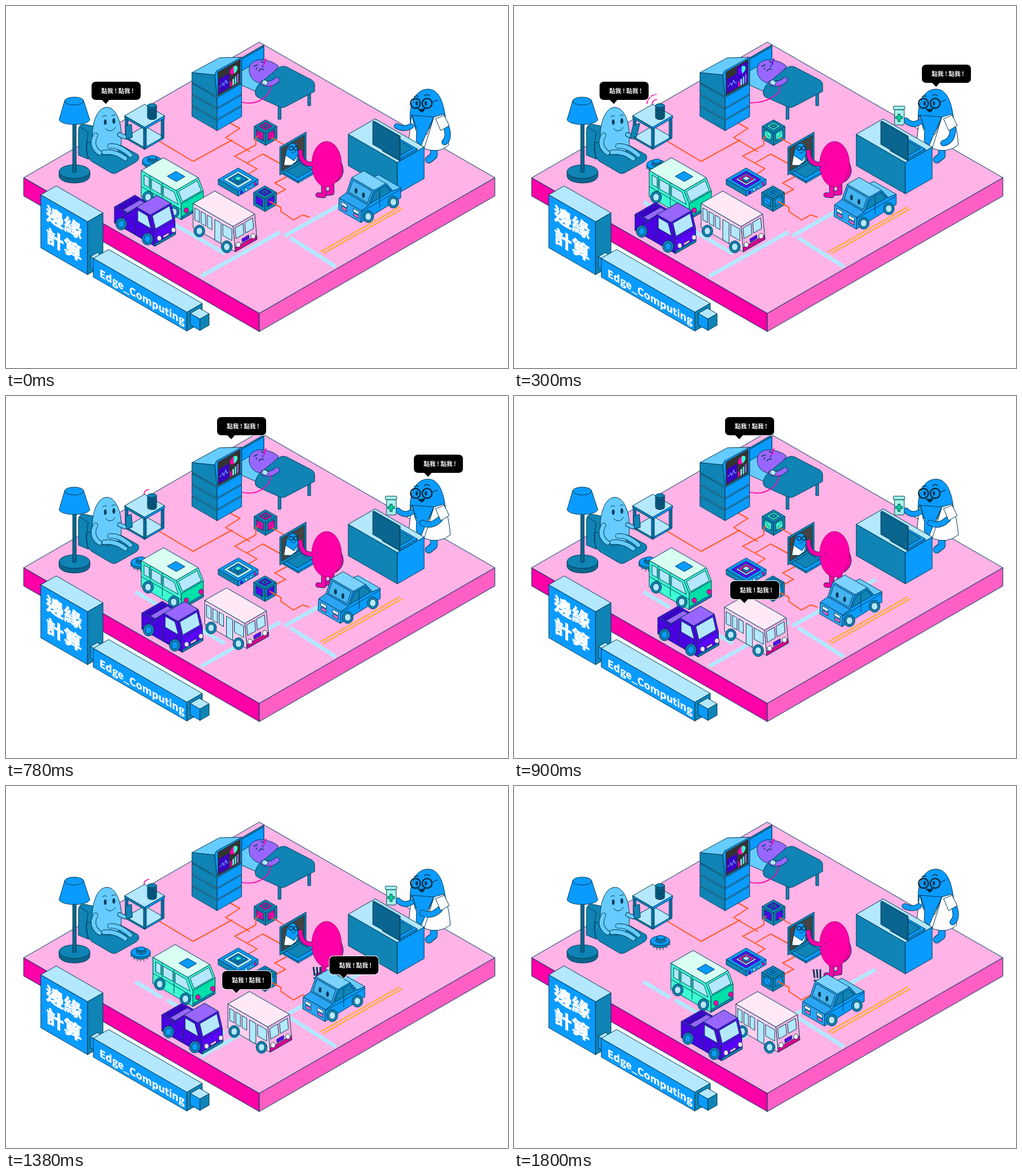
An HTML page that plays this animation: 880 by 636 pixels, repeating every 2100 ms.

```html
<!DOCTYPE html>
<html lang="zh-Hant">
<head>
<meta charset="utf-8">
<style>
html, body { margin: 0; width: 100%; height: 100%; overflow: hidden; background: #fff }
svg { display: block; width: 880px; height: 636px }
text { font-family: "Noto Sans CJK TC", "Noto Sans CJK", "Noto Sans", sans-serif; font-weight: 900; fill: #fff; stroke: none; white-space: pre }
</style>
</head>
<body>
<svg id="stage" viewBox="0 0 880 636" stroke="#003b57" stroke-linejoin="round"></svg>
<script>
const light = '#b3e8ff', sky = '#66ccff', blue = '#0a9bff', teal = '#0f84b5', deep = '#0a6690', ink = '#003b57';
const magenta = '#ff00a8', rose = '#ffb3e0', violet = '#9966ff', purple = '#5a00ff', dusk = '#3a00c8';
const mint = '#3dffd2', orange = '#ff5a26';
const k = .577; // slope of the ground axes

// Flat shapes
const poly = (fill, points) => `<polygon fill="${fill}" points="${points}"/>`;
const path = (fill, d, more = '') => `<path fill="${fill}" d="${d}" ${more}/>`;
const line = (d, color = ink, width = 1, more = '') => path('none', d, `stroke="${color}" stroke-width="${width}" ${more}`);
const oval = (fill, x, y, rx, ry = rx, more = '') => `<ellipse fill="${fill}" cx="${x}" cy="${y}" rx="${rx}" ry="${ry}" ${more}/>`;
const rect = (fill, x, y, w, h, more = '') => `<rect fill="${fill}" x="${x}" y="${y}" width="${w}" height="${h}" ${more}/>`;
const limb = (d, color, width) => line(d, ink, width, 'stroke-linecap="round"') + line(d, color, width - 2, 'stroke-linecap="round"');
const move = (x, y, body) => `<g transform="translate(${x} ${y})">${body}</g>`;
const repeat = (n, part) => Array.from({ length: n }, (_, j) => part(j)).join('');
const clamp = (v, max) => Math.min(max, Math.max(0, v));

// Isometric shapes: wall planes, ground tile, box from its near top corner
const leftWall = (x, y, body) => `<g transform="matrix(1 ${k} 0 1 ${x} ${y})">${body}</g>`;
const rightWall = (x, y, body) => `<g transform="matrix(1 ${-k} 0 1 ${x} ${y})">${body}</g>`;
const tile = (fill, x, y, a, b = a) => poly(fill, [x, y, x - a, y - a * k, x - a + b, y - (a + b) * k, x + b, y - b * k]);
const box = (x, y, a, b, h, top = light, left = teal, right = blue) => tile(top, x, y, a, b)
  + leftWall(x - a, y - a * k, rect(left, 0, 0, a, h)) + rightWall(x, y, rect(right, 0, 0, b, h));

// A point on the strip swept sideways from profile edge a-b: s along the edge, w across
function spot([a, b], s, w) {
  const p = a[0] + (b[0] - a[0]) * s, q = a[1] + (b[1] - a[1]) * s;
  return [p + w, (p - w) * k + q];
}
const pane = (fill, edge, s0, s1, w0, w1) =>
  poly(fill, [spot(edge, s0, w0), spot(edge, s1, w0), spot(edge, s1, w1), spot(edge, s0, w1)]);
const edgesOf = profile => profile.slice(1).map((point, j) => [profile[j], point]);

function prism(profile, width, fills, side) {
  const faces = edgesOf(profile).map((edge, j) => {
    const [[p, q], [r, t]] = edge;
    return 2 * k * (r - p) + t - q > 0 ? pane(fills[j], edge, 0, 1, 0, width) : '';
  });
  return faces.join('') + leftWall(0, 0, poly(side, profile));
}

const wheel = (p, q, hub) => move(p, p * k + q, oval(teal, 0, 0, 9.5, 10.5) + oval(hub, 0, 0, 5.5, 6.5));
const wheels = (p, r, q, hub = light) => wheel(p, q, hub) + wheel(r, q, hub);
const lamps = (fill, edge, s, inset, width) => [inset, width - inset].map(w => oval(fill, ...spot(edge, s, w), 4, 4.5)).join('');

function van() {
  const w = 39, shape = [[0, 0], [61, 0], [70, 18], [70, 46], [0, 46]], [roof, screen, front] = edgesOf(shape);
  return prism(shape, w, ['#d9fff3', mint, '#00e0a8'], mint)
    + pane(blue, roof, .52, .78, 14, 29) + pane(light, screen, .14, .92, 3, w - 3) + pane(teal, front, .84, 1, 0, w)
    + leftWall(0, 0, rect(light, 5, 5, 9, 17) + rect(light, 18, 5, 17, 17) + path(light, 'M39 5H58L65 22H39Z') + line('M16 0V42M37 0V42M0 28H70'))
    + wheels(12, 57, 40) + lamps(magenta, front, .6, 9, w + 5);
}

function bus() {
  const w = 38, shape = [[0, 0], [70, 0], [74, 42], [0, 42]], front = edgesOf(shape)[1];
  return prism(shape, w, ['#ffe9f7', rose], '#ffd0ee')
    + pane('#e0008f', front, .84, 1, 0, w) + pane(light, front, .1, .52, 3, 17) + pane(light, front, .1, .52, 20, 34)
    + pane(purple, front, .66, .8, 13, 25)
    + leftWall(0, 0, repeat(3, j => rect(light, 3 + j * 11, 6, 8, 21)) + rect(light, 38, 6, 11, 36) + rect(light, 52, 6, 16, 20))
    + wheels(11, 59, 42) + lamps('#fff', front, .8, 6, w);
}

function pickup() {
  const w = 36, shape = [[0, 0], [34, 0], [39, -22], [63, -22], [70, 4], [71, 28], [0, 28]];
  const [bed, , , screen, front] = edgesOf(shape);
  return prism(shape, w, [purple, purple, violet, purple, purple], '#4b00e0')
    + pane(dusk, bed, .08, .6, 3, w - 3) + pane(violet, bed, .35, .6, 3, w - 3)
    + prism(shape.slice(2), w, [violet, purple, purple], '#4b00e0') + pane(light, screen, .1, .86, 3, w - 3)
    + pane(teal, front, .84, 1, 0, w) + pane(rose, front, .6, .78, 15, 25)
    + leftWall(0, 0, path(light, 'M41 -18H58L64 1H41Z') + line('M37 0V28M62 4V24'))
    + wheels(12, 58, 23, blue) + lamps('#ffe0f4', front, .62, 8, w + 5);
}

function car() {
  const w = 39, shape = [[0, 0], [14, -2], [26, -22], [47, -22], [56, -1], [69, 1], [70, 21], [0, 18]];
  const [, , , screen, , front] = edgesOf(shape), body = '#2aa5f5';
  const eye = at => oval(ink, ...spot(screen, .6, at), 2, 4.5);
  return `<g transform="scale(-1 1)">${prism(shape, w, [sky, blue, '#7cd3ff', body, body, body], blue)
    + pane('#45b4f0', screen, .1, .9, 3, w - 3) + eye(13) + eye(26)
    + [4, w - 14].map(at => pane('#fff', front, .2, .45, at, at + 10) + pane('#ff66c4', front, .55, .78, at, at + 9)).join('')
    + leftWall(0, 0, path(teal, 'M27 -19H45L53 -3H17Z') + line('M37 -19V14M0 3H70')) + wheels(13, 57, 18)}</g>`;
}

function floor() {
  const road = d => line(d, light, 7);
  return box(444, 540, 413, 413, 32, '#ffb3e6', magenta, '#ff5fc4')
    + road('M342 475L481 397M488 404L634 322') + road('M498 407L578 458M227 344L274 372M282 376L384 435')
    + line('M551 432L690 353M556 435L695 356', '#ffad33', 2.5)
    + line('M266 236L328 273 397 235M390 204L410 215 385 231 428 256M438 244L401 264 440 286 424 296'
      + 'M422 276L450 260 481 277M492 300L471 311 490 322 470 333M482 354V361L504 376 520 367 532 371', orange, 2);
}

const sign = () => box(143, 379, 82, 27, 93, light, blue, teal) + box(158, 446, 10, 12, 20, light, blue, teal)
  + box(317, 538, 164, 27, 33, light, blue, teal) + box(340, 550, 17, 16, 20, light, blue, teal)
  + leftWall(70, 360, ['邊緣', '計算'].map((word, j) =>
    `<text y="${14 + j * 39}" font-size="31.5" style="stroke:#fff">${word}</text>`).join(''))
  + leftWall(164, 475, '<text font-size="17.6" style="font-weight:700;stroke:#fff;stroke-width:.4">Edge_Computing</text>');

const lamp = () => path(deep, 'M93 291V299C95 315 145 315 147 299V291Z') + oval(teal, 120, 291, 27, 12)
  + rect(deep, 117, 206, 6, 86) + path(blue, 'M103 166L93 200C98 211 142 211 147 200L136 166Z') + oval(blue, 119.5, 167, 16.5, 7);

const sofa = tapping => path(teal, 'M127 262V219Q127 206 139 208L168 214V262L144 269Z')
  + path(teal, 'M141 240Q139 266 150 273L184 293Q190 296 196 292L228 274Q236 268 231 261L190 238Z')
  + line('M144 269Q139 250 144 222L130 213')
  + path(sky, 'M177 178C193 178 202 205 202 224V240Q200 262 177 262Q153 262 151 236C150 205 160 178 177 178Z')
  + limb('M182 246Q198 244 218 262', sky, 9) + limb('M172 257Q190 254 209 268', sky, 9)
  + limb('M157 227Q147 246 164 258', sky, 9) + limb('M199 226L208 230', sky, 8)
  + `<g transform="translate(${tapping ? 204 : 209} 209) skewX(${tapping ? -14 : 4}) skewY(-17)">${rect(teal, tapping ? 5 : 0, 2, 11, 23, 'rx="1"')}</g>`
  + oval(ink, 174, 204, 2, 4.5) + oval(ink, 189, 202, 2, 4.5)
  + line('M174 215Q184 225 192 213M169 195q4 -4 8 -1M185 193q4 -3 7 -1');

function table(waves) {
  const leg = (x, y) => rect(teal, x, y, 3, 38) + rect(blue, x + 3, y, 2, 38);
  return box(243, 249, 33, 33, 3) + leg(241, 178) + leg(209, 194) + leg(272, 194) + leg(241, 212) + box(243, 213, 35, 35, 4)
    + path(deep, 'M248 175V195C249 201 263 201 264 195V175Z') + oval(teal, 256, 175, 8, 3.5)
    + repeat(5, j => line(`M248 ${181 + j * 4}q8 5 16 0`)) + line('M252 178V198M256 179V199M260 178V198')
    + (waves > 0 ? line('M242 173Q242 165 251 164', magenta, 1.7) : '')
    + (waves > 1 ? line('M233 172Q236 157 250 155', magenta, 1.7, 'stroke-dasharray="6 1.5"') : '');
}

const cleaner = () => repeat(7, j => line(`M${j * 5 - 15} ${13 - (j - 3) ** 2}l${j - 3} 4`))
  + path(teal, 'M-17 0V4C-14 15 14 15 17 4V0Z') + oval(blue, 0, 0, 17, 8.5) + oval(teal, 1, -1, 9, 4.5)
  + path(teal, 'M-6 -6V-2Q0 2 8 -2V-6Z') + oval(blue, 1, -6, 7, 3.5);

const server = alt => repeat(3, j => box(370, 201 - j * 20, 44, 43, 18, sky))
  + poly(teal, '326,117 366,121 370,159 326,134') + poly(sky, '326,117 374,91 413,90 368,116 366,121')
  + poly(blue, '366,121 369,114 413,90 413,135 370,159')
  + rightWall(371, 116, `<g stroke="none">${rect('#333', 0, 0, 40, 42) + rect(dusk, 2, 14, 18, 25)
    + (alt ? rect(dusk, 20, 3, 18, 36) : '') + oval(alt ? purple : magenta, 28, 13, 6.5)
    + path(mint, 'M28 13V6.5A6.5 6.5 0 0 1 29 19.5Z')
    + [magenta, light, mint, violet].map((c, j) => rect(c, 22 + j * 4, 30 - j * 2, 2.5, 9 + j * 2)).join('')
    + line('M3 28h3l3 -4 2 6 3 -8 2 7 3 -1', sky)}</g>`);

const bed = alt => rect(teal, 477, 174, 5, 25) + rect(teal, 529, 150, 5, 25)
  + rightWall(411, 92, rect(teal, 0, 0, 41, 45) + rect(blue, 2, 3, 39, 42))
  + path(sky, 'M413 114L432 103 462 133 440 151 413 139Z')
  + path(violet, 'M426 111Q427 96 446 94Q468 96 478 106L456 134Q443 138 434 130Q426 123 426 111Z')
  + path(teal, 'M437 150Q440 137 453 129L477 109Q485 104 492 107L536 130Q542 134 541 141V150L490 177Q483 180 477 176L441 160Q436 157 437 150Z')
  + limb('M451 135Q464 140 475 130', violet, 10) + limb('M453 134L455 135', light, 9)
  + line('M434 106l7 -3M447 97l6 3M439 108v4M450 104v4M443 115q4 -7 9 -3', ink, 1.4)
  + line('M452 104L456 92', alt ? purple : magenta, 2)
  + line(alt ? 'M413 170Q437 171 455 159Q470 150 465 137' : 'M413 169Q435 174 450 163Q466 152 463 138', magenta, 1.7);

const cube = (x, y, color) => move(x, y, box(0, 1, 20, 20, 22, teal, teal, teal)
  + tile(color, 0, -4, 12) + tile(teal, 0, -7, 7) + tile(color, 0, -9, 3)
  + leftWall(-16, -5, rect(color, 0, 0, 12, 13) + line('M0 0L12 13', ink, .7))
  + rightWall(4, 2, rect(color, 0, 0, 12, 13) + line('M12 0L0 13', ink, .7)));

const router = hot => box(407, 325, 35, 35, 9, blue)
  + tile(hot ? purple : light, 407, 320, 26) + tile(hot ? light : teal, 407, 315, 18) + tile(hot ? magenta : blue, 407, 312, 14)
  + box(407, 307, 7, 7, 3, hot ? light : mint)
  + [purple, light, sky, magenta].map((c, j) => rect(c, 411 + j * 8, 325 - j * 5, 4, 5, 'stroke-width=".7"')).join('');

const glasses = (x, y, r, width) => [-1, 1].map(s => oval('none', x + s * r * 1.2, y, r, r, `stroke="#022b3f" stroke-width="${width}"`)).join('');

const call = () => box(512, 308, 31, 35, 3, blue) + tile(teal, 511, 302, 22, 25)
  + rightWall(480, 248, rect(teal, 0, 0, 46, 49) + rect('#444', 3, 4, 40, 40))
  + path(blue, 'M489 276Q490 242 503 241Q513 242 513 272L500 280Z')
  + path('#fff', 'M490 262L487 280 500 280 509 273 512 260 505 272Z') + glasses(504, 250, 3.5, 1.5) + line('M500 257q4 3 8 -2');

const caller = () => limb('M571 314V328L561 329', magenta, 9) + limb('M557 314V333L547 332', magenta, 9)
  + limb('M578 266Q596 292 578 305', magenta, 9) + oval(magenta, 562, 278, 26, 40, 'stroke="#a80070"')
  + limb('M542 278Q517 281 516 256', magenta, 9) + line('M540 272L543 283', magenta, 8);

// Doctor poses: 0 resting on the desk, 1 showing medicine, 2 hand on the belly
function doctor(pose) {
  const arm = ['M770 208Q779 230 769 239', 'M769 212Q771 236 753 241', 'M760 217Q745 231 730 223'][pose];
  const medicine = rect('#a5f5e8', 667, 182, 17, 27, 'rx="2"') + rect('#a5f5e8', 665, 176, 20, 6, 'rx="1"')
    + path('#00d69b', 'M673 190h4v4h4v4h-4v5h-4v-5h-4v-4h4Z');
  return limb('M750 248V263L741 270', blue, 13)
    + path(blue, 'M710 215C704 180 714 146 740 146C763 146 770 180 772 215Z')
    + path('#fff', `M711 191L706 238 732 250Q760 260 ${pose ? 779 : 776} 244Q776 208 767 190L750 195 738 226 718 218Z`)
    + path(blue, 'M712 192L750 195 737 223 728 245 719 238 720 216Z')
    + line('M750 195L742 222 733 250')
    + limb(pose ? 'M711 204Q698 212 687 201' : 'M710 211Q698 218 685 211', blue, 10)
    + limb(arm, blue, 11) + poly('#fff', '753,198 768,192 777,210 762,219')
    + glasses(728, 171, 8.5, 2.5) + oval(ink, 720, 171, 1.8, 3.5) + oval(ink, 736, 171, 1.8, 3.5)
    + line('M747 169L757 165M715 160q4 -4 8 -1M733 158q5 -5 10 0', '#022b3f', 1.3)
    + path('#022b3f', 'M721 180Q729 183 735 179Q732 188 727 186Z') + (pose ? medicine : '');
}

const desk = () => box(686, 275, 86, 47, 55) + box(690, 269, 30, 31, 3, blue) + tile(teal, 692, 262, 20, 21)
  + leftWall(645, 202, rect(teal, 0, 0, 46, 41)) + leftWall(643, 203, rect(deep, 0, 0, 47, 40));

const bubble = (x, y) => move(x, y,
  path('#000', 'M8 0H78Q86 0 86 8V24Q86 32 78 32H31L25 39 18 32H8Q0 32 0 24V8Q0 0 8 0Z', 'stroke="#fff" stroke-width="2" paint-order="stroke"')
  + '<text x="17" y="19.5" font-size="10.5">點我 ! 點我 !</text>');

const alarm = (x, y) => move(x, y, repeat(3, j => line(`M${1 + j * 6} 0L${3 + j * 5} 15m0 3v3`, ink, 3)));

// One speech bubble opens per step and stays for two
const bubbles = [[150, 133], [715, 103], [370, 37], [379, 325], [567, 299]];
const pickupRun = [0, 22, 48, 62, 83, 103, 103], carRun = [0, 22, 36, 47, 63, 78, 78];

function scene(i) {
  const away = Math.abs(i - 3), alt = away == 2;
  const sweep = clamp((away - 1) * 13.5, 20);
  const go = (x, y, run, body) => move(x + run, y + Math.abs(run) * .59, body);
  return floor() + sign() + lamp() + table([0, 1, 2, 0][away]) + sofa(alt) + bed(alt) + server(alt)
    + cube(455, 222, i % 2 ? mint : i == 6 ? purple : magenta) + cube(454, 338, i == 0 || i == 2 ? purple : blue)
    + line('M443 228L438 231V244M465 231L486 243M462 343L482 354', orange, 2)
    + router(i % 2 || i == 6) + call() + caller() + doctor(Math.min(2, 3 - away)) + desk()
    + move(236 + sweep, 292 - sweep, cleaner())
    + (i == 4 ? alarm(538, 318) : i == 6 ? alarm(524, 322) : '')
    + go(237, 289, clamp((i - 3) * 20.5, 38), van()) + go(328, 347, clamp((i - 1) * 20.5, 61), bus())
    + go(190, 353, pickupRun[i], pickup()) + move(692 - carRun[i], 319 + carRun[i] * .53, car())
    + bubbles.map(([x, y], n) => i == n || i == n + 1 ? bubble(x, y) : '').join('');
}

const stage = document.getElementById('stage');
let shown = -1;
function draw() {
  const step = Math.floor(performance.now() % 2100 / 300);
  if (step != shown) stage.innerHTML = scene(shown = step);
  requestAnimationFrame(draw);
}
draw();
</script>
</body>
</html>
```
